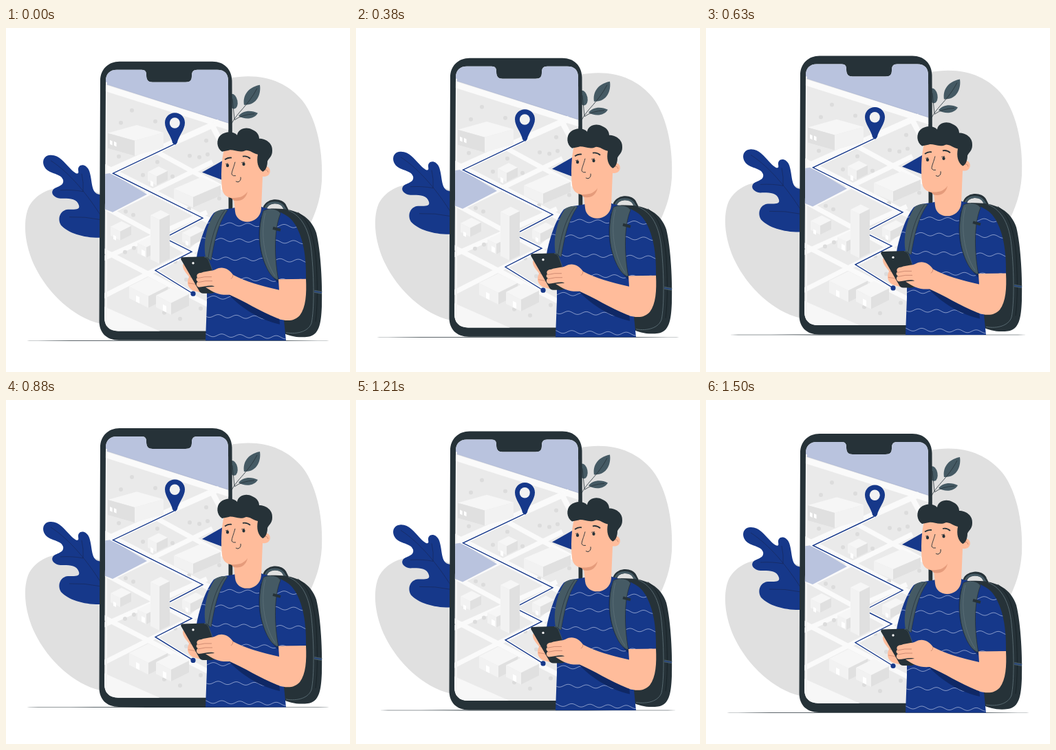
Animation of 500x500 px, one loop 1540 ms. Source, as an HTML page with a canvas:

```html
<!DOCTYPE html>
<html lang="en">
<head>
<meta charset="utf-8">
<title>Floating map</title>
<style>
html, body { margin: 0; width: 100%; height: 100%; overflow: hidden; background: #fff; }
canvas { display: block; width: 100vw; height: 100vh; }
</style>
</head>
<body>
<canvas id="stage" width="500" height="500"></canvas>
<script>
const ctx = document.getElementById('stage').getContext('2d');
const LOOP = 1540, FPS = 24, STEPS = 36, LIFT = 10;
const BLUE = '#16388a', DARK = '#263238', SLATE = '#455a64', SKIN = '#ffbc9b', SKIN_LINE = '#b97862';
const WALL_LIGHT = '#f2f2f2', WALL_DARK = '#e0e0e0';

function fill(d, color) {
  ctx.fillStyle = color;
  ctx.fill(new Path2D(d));
}
function line(d, color, width = 0.7) {
  ctx.strokeStyle = color;
  ctx.lineWidth = width;
  ctx.stroke(new Path2D(d));
}
function oval(x, y, rx, ry, color, angle = 0) {
  ctx.fillStyle = color;
  ctx.beginPath();
  ctx.ellipse(x, y, rx, ry, angle, 0, Math.PI * 2);
  ctx.fill();
}
function clipped(d, draw) {
  ctx.save();
  ctx.clip(new Path2D(d));
  draw();
  ctx.restore();
}

// Isometric block; (x, y) is the front corner of its roof.
function block(x, y, left, right, height, slope = 0.5, leftWall = WALL_LIGHT, rightWall = WALL_DARK) {
  const l = left * slope, r = right * slope;
  fill(`M${x},${y} l${-left},${-l} l${right},${-r} l${left},${l} Z`, '#f6f6f6');
  fill(`M${x},${y} l${-left},${-l} v${height} l${left},${l} Z`, leftWall);
  fill(`M${x},${y} l${right},${-r} v${height} l${-right},${r} Z`, rightWall);
}
function door(x, y, width, height) {
  fill(`M${x},${y} l${width},${width / 2} v${height} l${-width},${-width / 2} Z`, '#fff');
}

function drawBackdrop() {
  fill('M325,73 C370,65 406,76 431,106 C454,136 461,185 459,223 C457,252 449,271 440,290 L400,440 H200 L137,430 C98,421 61,386 42,347 C28,318 24,285 32,263 C45,232 91,220 145,244 Z', '#e0e0e0');
  oval(250, 454.6, 220, 0.45, DARK);
}

function drawPlants() {
  fill('M140,305 C115,306 91,299 80,287 C74,277 79,265 90,264 C100,264 108,265 106,258 C103,247 90,248 79,248 C70,247 65,241 68,236 C72,230 85,231 83,221 C80,212 67,213 59,206 C51,198 53,186 64,185 C77,184 84,195 92,203 C99,211 107,216 105,207 C104,198 116,196 121,208 C126,222 123,240 135,242 L140,244 Z', BLUE);
  line('M65,193 C93,211 119,243 139,275 M79,236 Q98,235 112,238 M92,275 Q115,274 138,279 M110,212 Q113,225 112,238', '#17295b');
  oval(330, 107, 6.5, 11, SLATE, -0.2);
  fill('M346,112 C344,101 349,87 369,83 C371,96 365,113 346,112 Z', SLATE);
  fill('M338,128 C344,120 356,119 366,124 C361,133 347,134 338,128 Z', SLATE);
  line('M328,139 C336,123 352,113 365,88 M332,134 Q343,126 361,125 M332,133 L329,103', DARK, 0.8);
}

function drawMap() {
  ctx.fillStyle = '#eaeaea';
  ctx.fillRect(140, 55, 190, 390);
  fill('M140,404 L226,442 H140 Z', '#f7f7f7');
  fill('M140,55 H330 V141 L140,80 Z', '#b9c3de');
  line('M140,86 L330,146', '#fafafa', 9);
  line('M140,213 L310,137 M140,201 L310,288', '#fafafa', 9);
  line('M213,177 L325,238 M155,266 L300,195 M140,259 L300,346', '#fafafa', 7);
  line('M140,336 L292,268 M140,391 L300,310 M140,323 L300,406', '#fafafa', 7);
  line('M298,139 L325,190 M268,325 L300,298', '#fafafa', 8);
  line('M146,79 V440', '#f5f5f5', 2);
  line('M146,82 L323,138', '#a9b3cf', 0.5);
  fill('M140,213 L153,211 L205,242 L155,268 L140,262 Z', '#b9c3de');
  fill('M285,210 L315,193 L322,224 Z', BLUE);

  const trees = [[183, 120], [167, 138], [217, 136], [164, 187], [220, 195], [242, 216], [267, 186],
    [281, 188], [293, 184], [291, 164], [199, 214], [185, 272], [174, 267], [266, 263], [173, 326],
    [186, 320], [246, 340], [230, 414], [253, 423], [283, 408], [262, 366], [310, 248]];
  trees.forEach(([x, y]) => oval(x, y, 3, 3, '#dcdcdc'));

  block(187, 164, 39, 42, 22, 0.28, WALL_DARK, WALL_LIGHT);
  door(151, 163, 3.5, 6);
  door(157, 165, 3.5, 6);
  block(219, 216, 13, 16, 13);
  door(210, 222, 4, 7);
  block(272, 246, 28, 40, 15, 0.43);
  block(166, 296, 14, 16, 13);
  door(156, 301, 4, 6);
  block(204, 319, 13, 18, 15);
  door(197, 322, 5, 8);
  block(268, 304, 12, 20, 13);
  door(261, 309, 4, 6);
  block(223, 279, 13, 15, 64);
  block(207, 390, 28, 28, 17);
  door(189, 389, 5, 9);
  block(240, 400, 22, 26, 17);
  door(228, 402, 5, 9);

  const route = 'M244,169.5 L155.5,211.5 L286,276.5 L238,301.5 M238,309.5 L270,325.5 L217,352.5 L272,386.5';
  line(route, '#fff', 4);
  line(route, BLUE, 1.4);
  oval(272, 386.5, 3.6, 3.6, BLUE);
  fill('M245.5,123.5 C254,123.5 260,130 260,138 C260,148 251,157 248.8,167 Q245.5,173 242,167 C240,157 231,148 231,138 C231,130 237,123.5 245.5,123.5 Z', BLUE);
  oval(245.3, 138.3, 7.5, 7.8, '#f2f2f2');
}

function drawPhone() {
  fill('M165,49 H300 C317,49 328,60 328.5,77 L330,425 C330,443 319,454 302,454 H164 C146,454 135.5,443 135.5,426 L137,77 C137,60 149,49 165,49 Z', DARK);
  clipped('M161,61 H197 C203,61 204,64 204,69 C204,76 207,79 213,79 H261 C268,79 270,76 270,70 C270,64 272,61 278,61 H307 C318,61 323,67 323,77 L324,440.7 H163 C150,440.7 143,433 143,421 L145,77 C145,67 151,61 161,61 Z', drawMap);
}

function drawBackpack() {
  line('M376,264 C378,250 401,249 405,260 L411,272', DARK, 6);
  line('M377,262 C382,251 399,252 404,261 L411,272', SLATE, 3);
  fill('M385,263 C421,261 443,274 451,298 C458,326 460,375 459,405 C458,430 455,447 439,449 C425,451 411,448 402,443 Z', DARK);
  line('M410,265 C431,274 441,295 444,325 C448,365 448,410 444,429 C440,441 424,446 407,443', '#63757d', 0.8);
  line('M424,268 C441,280 448,304 451,340 C453,375 453,403 450,427', '#131d21');
  line('M448,383 L459,385', SLATE, 4);
  line('M448,383 L459,385', BLUE, 1);
}

const SHIRT = 'M334,261 C322,264 312,263 302,269 C290,284 281,312 277,334 L292,341 V400 L290,454.5 H407 L404,425 L396,366 L436,365.5 C437,325 429,296 416,280 C404,266 385,265 371,260 Z';

function drawShirt() {
  fill(SHIRT, BLUE);
  clipped(SHIRT, () => {
    for (const y of [286, 309, 336, 365, 393, 420, 448]) {
      ctx.beginPath();
      for (let x = 275; x <= 440; x += 2) {
        ctx.lineTo(x, y + (x - 340) * 0.03 + 2.2 * Math.sin((x + y * 1.7) / 4.2));
      }
      ctx.strokeStyle = 'rgba(235,240,255,.65)';
      ctx.lineWidth = 0.8;
      ctx.stroke();
    }
    fill('M322,386 L397,420 L398,431 C370,425 342,408 322,386 Z', '#0f2865');
    fill('M370,275 C363,310 370,345 395,371 L398,366 C381,347 376,310 376,275 Z', '#102b6c');
  });
  const strap = 'M374,266 C382,261 396,263 399,270 C389,294 390,334 396,367 C386,364 380,352 376,342 C367,319 366,290 374,266 Z';
  fill(strap, SLATE);
  line(strap, DARK, 0.8);
  line('M377,269 C370,295 374,335 391,361', '#657880', 0.6);
  line('M388,291 L399,294', DARK, 4);
  fill('M304,268 C310,264 318,263 322,265 C307,286 303,311 298,338 L290,333 C286,310 293,284 304,268 Z', SLATE);
  line('M322,265 C307,286 303,311 298,338 M318,265 C303,285 298,310 294,334', DARK, 0.7);
}

function drawHead() {
  fill('M317,176 C313,193 312,216 314,233 C315,243 322,247 331,248 L333,267 C335,288 369,287 371,263 L373,216 C386,218 387,203 378,201 L367,172 Z', SKIN);
  fill('M327,247 C339,248 346,245 351,238 C349,249 340,253 331,251 Z', '#e59b7b');
  fill('M314,180 C306,175 305,162 312,156 C319,150 331,150 336,156 C337,147 349,143 358,148 C365,151 368,156 368,161 C378,161 388,168 387,179 C387,187 382,189 380,194 C380,202 377,208 373,209 C366,204 364,195 366,184 C358,182 355,178 349,178 C339,183 330,176 324,178 Z', DARK);
  oval(322, 200, 2.1, 2.5, DARK);
  oval(345.5, 198, 2.1, 2.5, DARK);
  line('M318,191.5 Q323,188 328,189 M344,187 Q350,185.5 355,190', DARK, 1.8);
  line('M319,198 l4,-1 M342,196 l5,-1', DARK, 0.7);
  line('M333,195 C331,203 328,209 328,213 Q330,216 334,215', DARK, 0.9);
  line('M334,223 C338,226 342,222 341,217', DARK, 1);
  line('M376,207 Q380,205 381,210', SKIN_LINE);
}

function drawHands() {
  fill('M257,343 C256,352 263,357 266,362 C262,370 264,378 272,382 L284,385 L290,365 L266,349 Z', SKIN);
  line('M267,362 Q274,362 280,367 M265,371 Q273,371 281,376', SKIN_LINE, 0.6);
  fill('M255,333.5 L288,332.5 Q293,332.5 295,336 L306,378 Q306,386 298,386 H287 Q282,386 280,381 L254,336 Z', DARK);
  line('M288,333 Q292,333 294,337 L300,352', SLATE, 0.8);
  oval(272, 342, 1.7, 1.7, '#f5f5f5');
  fill('M396,365.5 L436,365 C437,387 436,406 427,418 C419,427 407,427 394,422 C369,412 346,397 325,388 C310,389 302,385 290,377 L303,376 C298,373 287,377 280,377 C276,375 276,371 279,369 C276,367 276,365 278,363 C276,359 279,356 284,356 C291,353 299,354 305,351 C314,346 324,350 330,359 C348,369 371,375 397,381 Z', SKIN);
  line('M278,364 Q289,361 299,362 M279,370 Q290,367 300,368 M330,359 Q330,363 327,365', SKIN_LINE, 0.7);
}

function draw(now) {
  const step = Math.floor((now % LOOP + 5) * FPS / 1000);
  const phase = Math.min(1, (step + 0.5) / STEPS);
  const rise = LIFT * (1 - Math.abs(1 - 2 * phase));

  ctx.fillStyle = '#fff';
  ctx.fillRect(0, 0, 500, 500);
  ctx.save();
  ctx.translate(0, -rise);
  drawBackdrop();
  drawPlants();
  drawPhone();
  drawBackpack();
  drawShirt();
  drawHead();
  drawHands();
  ctx.restore();
}

let start;
function tick(now) {
  start ??= now;
  draw(now - start);
  requestAnimationFrame(tick);
}
draw(0);
requestAnimationFrame(tick);
</script>
</body>
</html>
```
